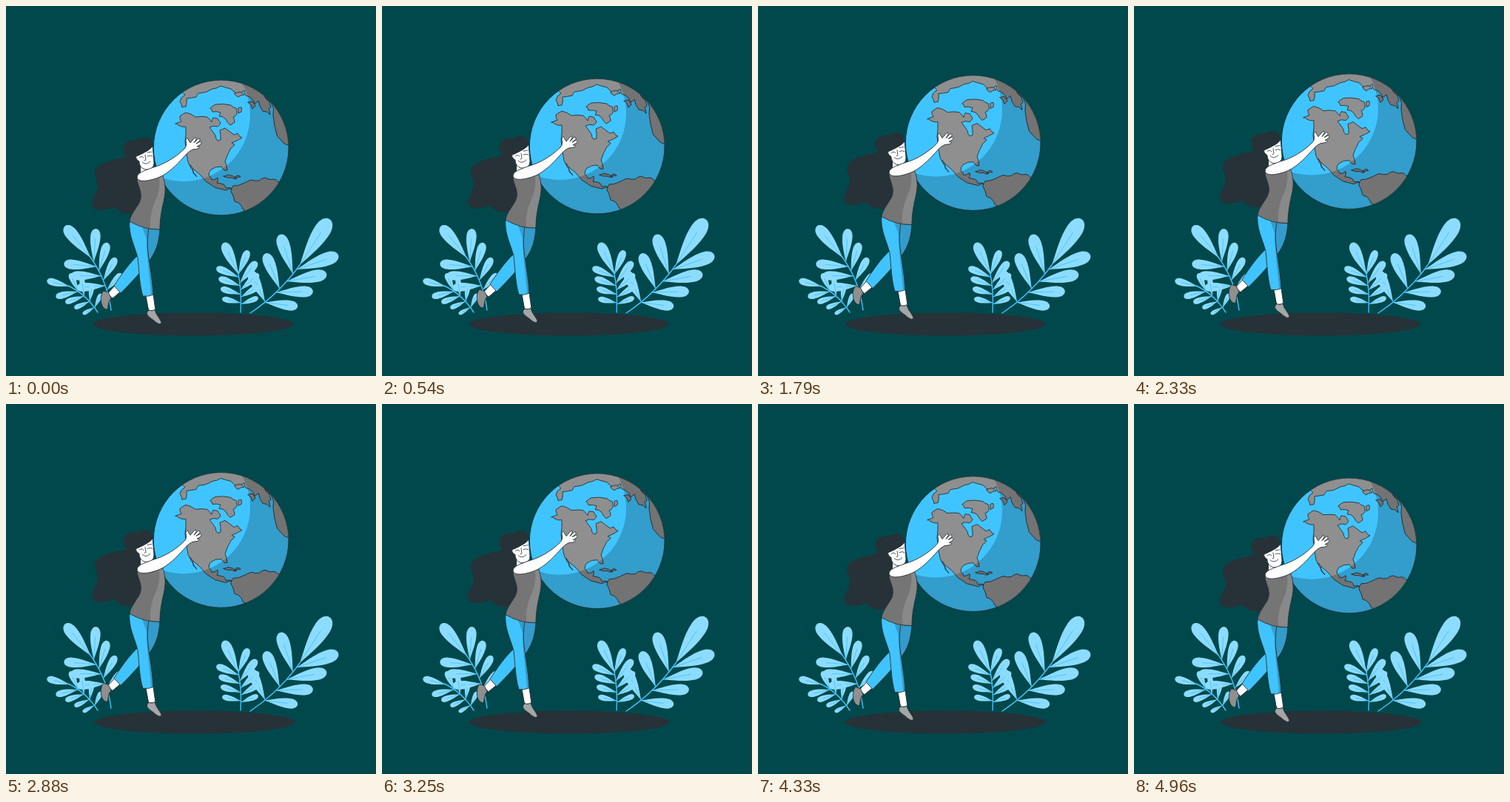
Write an HTML page that moves like this. It is 500 px wide and 500 px high and loops after 5.04 s.

```html
<!DOCTYPE html>
<html lang="en">
<head>
<meta charset="utf-8">
<title>Hugging the Earth</title>
<style>
  html, body { margin: 0; width: 100%; height: 100%; overflow: hidden; background: #00484b; }
  svg { display: block; width: 100vw; height: 100vh; }
  .line { stroke: #263238; stroke-width: .9; stroke-linejoin: round; stroke-linecap: round; }
  .thin { fill: none; stroke: #263238; stroke-width: .8; stroke-linecap: round; stroke-linejoin: round; }
  .dark { fill: #263238; }
  .sea { fill: #40c4ff; }
  .land { fill: #8f8f8f; }
  .skin { fill: #fff; }
  .shade { fill: #000; fill-opacity: .2; }
  .leaf { fill: #8cdcff; }
  .stem { fill: none; stroke: #40c4ff; stroke-width: 1.4; stroke-linecap: round; }
  .rib { fill: none; stroke: #40c4ff; stroke-width: .8; stroke-linecap: round; }
</style>
</head>
<body>
<svg viewBox="0 0 500 500">
  <defs>
    <clipPath id="ball"><circle cx="290.7" cy="191.5" r="91.3"/></clipPath>
  </defs>

  <ellipse id="shadow" class="dark" cx="253" cy="430" rx="135.5" ry="15.5"/>
  <g id="plants"></g>

  <g id="float">
    <!-- globe -->
    <g clip-path="url(#ball)">
      <circle class="sea" cx="290.7" cy="191.5" r="91.3"/>
      <g id="coasts" class="land line">
        <polygon points="230,114 242,120 235,129 238,137 243,136 244,125 257,123 260,118 279,112 290,108 304,112 313,119 322,114 324,121 333,126 336,132 341,128 347,142 357,147 355,139 358,137 349,122 358,130 361,148 363,162 376,186 386,189 400,150 350,80 270,80"/>
        <polygon points="276,138 283,133 304,134 311,138 312,146 307,150 309,157 303,161 297,153 288,149 290,144 279,143"/>
        <polygon points="314,138 318,137 318,143 314,145"/>
        <polygon points="309,118 316,116 322,120 314,123"/>
        <polygon points="327,130 333,129 337,135 333,139"/>
        <polygon points="229,159 237,156 235,149 243,144 256,150 272,150 278,157 280,151 286,152 290,158 286,163 275,164 283,175 286,182 290,181 289,168 296,165 308,174 313,172 319,178 305,185 309,187 304,192 296,210 299,222 295,222 291,217 277,221 274,229 278,235 286,232 285,239 294,241 297,246 308,248 297,249 270,237 253,220 246,211 242,183 243,163 233,161"/>
        <polygon points="249,215 253,223 258,231 253,226"/>
        <polygon points="294,230 300,228 312,233 305,232"/>
        <polygon points="309,232 313,229 317,231"/>
        <polygon points="304,250 307,243 320,240 331,235 342,236 350,232 363,234 368,238 380,238 360,280 323,290 324,277 318,270 309,264"/>
      </g>
      <path class="shade" fill-rule="evenodd" d="M190 90 H390 V290 H190 Z M150 147 a90 90 0 1 0 180 0 a90 90 0 1 0 -180 0 Z"/>
    </g>
    <circle class="thin" cx="290.7" cy="191.5" r="91.3"/>

    <!-- hair -->
    <path class="dark" d="M199 190 C198 180 190 173 178 181 C168 179 150 186 163 204 C153 207 129 209 121 221 C117 230 126 238 124 246 C121 255 114 264 117 271 C121 278 135 276 144 272 C149 271 153 281 162 280 C171 283 178 274 182 268 L190 200 Z"/>

    <!-- back leg -->
    <g class="line">
      <path class="skin" d="M147 378 L137 389 L144 395 L156 385 Z"/>
      <path class="land" d="M138 387 L132 385 C126 390 127 410 137 410 C139 405 137 400 142 395 Z"/>
      <path class="sea" d="M208 300 C207 318 204 328 197 339 C186 356 169 374 155 388 L146 378 C155 364 166 348 179 336 L186 298 Z"/>
    </g>
    <path class="shade" d="M208 301 C207 318 204 328 196 339 L190 347 L188 300 Z"/>

    <!-- front leg -->
    <g class="line">
      <path class="skin" d="M189 390 L199 390 L202 411 L193 412 Z"/>
      <path d="M193 411 Q198 413 201 410 C202 417 209 423 210 428 Q209 432 202 427 C198 422 185 418 193 411 Z" fill="#a6a6a6"/>
      <path class="sea" d="M167 290 C165 309 174 324 178 340 C180 357 180 376 185 392 Q193 393 199 390 C198 370 194 350 192 333 C190 319 192 310 193 298 Z"/>
    </g>
    <path class="shade" d="M182 290 C183 300 189 308 190 318 C190 337 194 365 196 390 H199 C198 370 194 350 192 333 Q190 319 193 298 Z"/>

    <!-- shirt -->
    <path class="line" fill="#757575" d="M177 235 C179 246 186 254 180 266 C174 276 168 283 167 291 Q188 303 208 302 C208 285 210 274 213 263 C217 250 215 238 211 227 L194 228 Z"/>
    <path fill="#898989" d="M212 231 Q216 246 213 262 Q208 282 207 301 L195 300 C194 286 197 274 202 263 Q209 247 207 231 Z"/>

    <!-- head -->
    <path class="skin" d="M182 212 V226 L196 222 V212 Z"/>
    <path class="skin line" d="M198 189 C194 195 186 198 179 202 C175 202 174 206 180 210 C180 216 184 221 190 221 Q200 221 200 212 Z"/>
    <path class="dark" d="M199 189 C196 181 188 179 181 184 C176 190 175 197 177 203 C184 199 193 197 199 189 Z"/>
    <path class="thin" d="M180 205 Q183 202 186 205 M191 203 Q195 201 198 203 M188 201 L189 208 L187 209 M184 211 Q189 216 195 210 M180 200 L185 199 M191 198 L197 197"/>

    <!-- arm -->
    <path class="skin line" d="M177 231 C178 225 186 223 199 218 C214 214 230 204 241 193 Q245 189 243 182 Q244 176 246 180 L249 185 L255 178 Q258 177 257 180 L254 185 L260 179 Q263 179 262 182 L257 186 L263 183 Q265 184 263 187 L258 190 Q265 190 259 193 L252 194 Q246 197 243 201 C234 211 224 222 212 229 C201 235 177 241 177 231 Z"/>
  </g>
</svg>
<script>
const LOOP = 5040, STEP = 41.68, STEPS = 120;
const RISE = 9, UNIT = 0.9;
// sideways offsets, one per tenth of the loop
const SHAKE = [0, -1, 2, -4, 4, -4, 4, -4, 2, -1, 0];

const $ = id => document.getElementById(id);
const mix = (a, b, k) => a + (b - a) * k;

// break each straight shore in two with a small seeded offset
let seed = 7;
const random = () => (seed = seed * 16807 % 2147483647) / 2147483647;

function roughen(shape) {
  const pts = shape.getAttribute("points").split(" ").map(p => p.split(",").map(Number));
  const out = pts.flatMap(([x, y], i) => {
    const [nx, ny] = pts[(i + 1) % pts.length];
    const k = (random() - 0.5) * 0.3;
    return [[x, y], [(x + nx) / 2 + (y - ny) * k, (y + ny) / 2 + (nx - x) * k]];
  });
  shape.setAttribute("points", out.join(" "));
}
$("coasts").querySelectorAll("polygon").forEach(roughen);

function leaf(x, y, angle, len) {
  const h = len * 0.15, a = len * 0.3, b = len * 0.5, c = len * 0.76, d = len * 1.08;
  return `<g transform="translate(${x} ${y}) rotate(${angle})">
    <path class="leaf" d="M0 0 C${a} ${-h * 0.5} ${b} ${-h} ${c} ${-h} C${d} ${-h} ${d} ${h} ${c} ${h} C${b} ${h} ${a} ${h * 0.5} 0 0 Z"/>
    <path class="rib" d="M0 0 H${len * 0.7}"/></g>`;
}

// stem: root, bend, top; each run of leaves: count, place on stem, angle, length (from, to)
function plant(root, bend, top, ...runs) {
  const at = (u, i) => mix(mix(root[i], bend[i], u), mix(bend[i], top[i], u), u);
  let svg = `<path class="stem" d="M${root} Q${bend} ${top}"/>`;
  for (const [count, u0, u1, a0, a1, l0, l1] of runs) {
    for (let i = 0; i < count; i++) {
      const k = i / Math.max(1, count - 1), u = mix(u0, u1, k);
      svg += leaf(at(u, 0), at(u, 1), mix(a0, a1, k), mix(l0, l1, k));
    }
  }
  $("plants").innerHTML += svg;
}

plant([330, 415], [369, 389], [397, 350],
  [1, 1, 1, -57, -57, 74, 74],
  [3, .84, .27, -108, -116, 56, 47],
  [4, .92, .26, -19, 7, 60, 45]);
plant([317, 414], [319, 385], [313, 357],
  [2, .9, .9, -115, -68, 47, 35],
  [4, .83, .22, -157, -167, 33, 26],
  [4, .69, .19, -52, -21, 37, 25]);
plant([142, 411], [137, 371], [113, 338],
  [1, .97, .97, -129, -129, 55, 55],
  [4, .88, .35, -86, -48, 45, 30],
  [3, .79, .43, 185, 176, 44, 39]);
plant([124, 414], [108, 389], [84, 378],
  [1, .95, .95, 195, 195, 32, 32],
  [4, .7, .14, 167, 150, 31, 18],
  [4, .7, .13, -114, -65, 27, 21]);

function shakeAt(phase) {
  const pos = phase * 10, i = Math.floor(pos);
  return mix(SHAKE[i], SHAKE[i + 1], pos - i);
}

function draw(time) {
  const step = Math.min(STEPS - 1, Math.floor((time % LOOP + 6) / STEP));
  const phase = step / STEPS;
  const lift = RISE * (1 - Math.abs(1 - 2 * phase));
  $("float").setAttribute("transform", `translate(0 ${-lift})`);
  $("shadow").setAttribute("transform", `translate(${shakeAt(phase) * UNIT} 0)`);
}

const start = performance.now();
function tick() {
  draw(performance.now() - start);
  requestAnimationFrame(tick);
}
tick();
</script>
</body>
</html>
```
